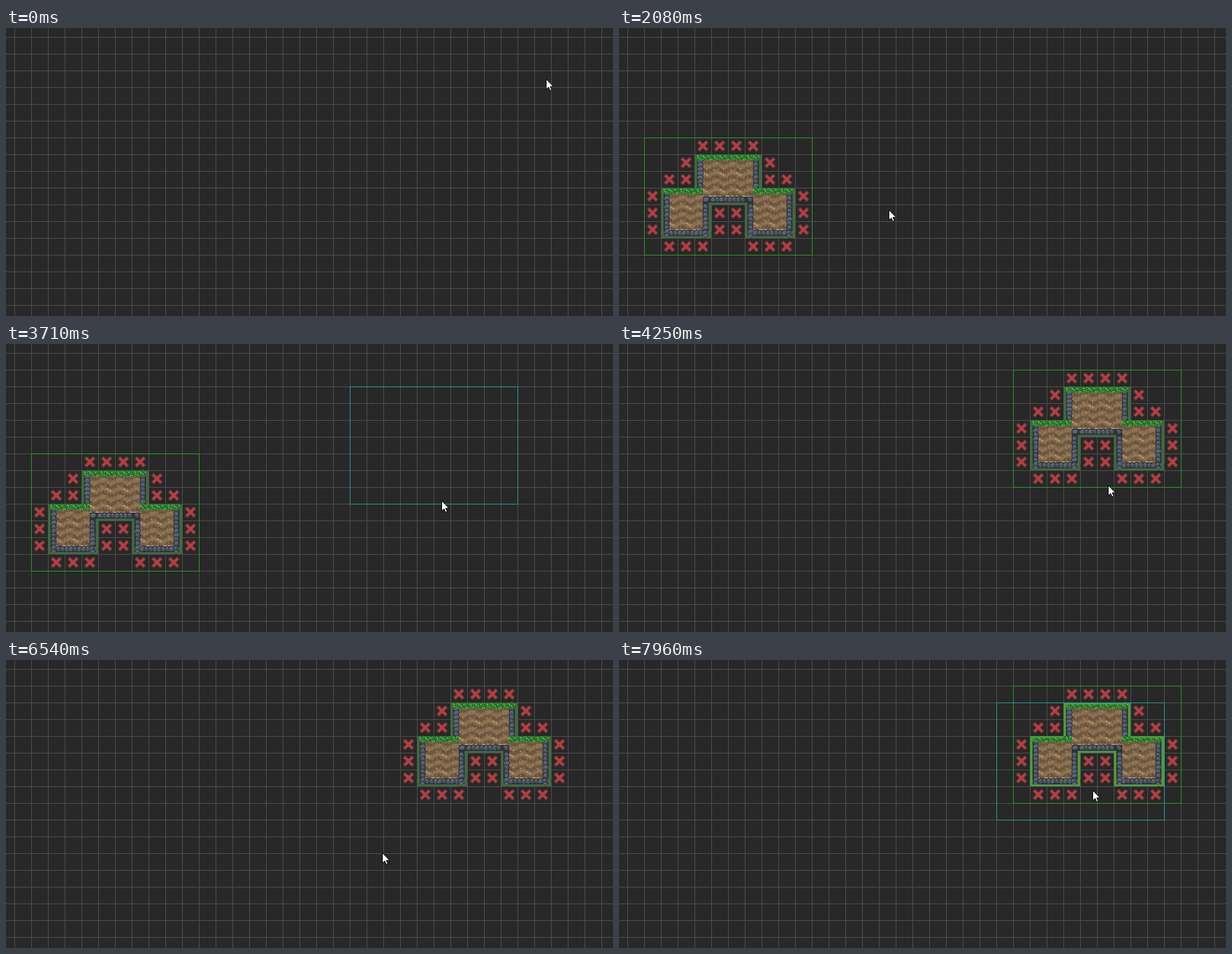
Animation, 941 px wide and 447 px high, one loop 8000 ms. Source, as an HTML page with a canvas:

```html
<!DOCTYPE html>
<html lang="en">
<head>
<meta charset="utf-8">
<title>Moving a tile group on a grid</title>
<style>
html, body { margin: 0; width: 100%; height: 100%; overflow: hidden; background: #282828; }
canvas { display: block; }
</style>
</head>
<body>
<canvas id="stage" width="941" height="447"></canvas>
<script>
const CELL = 26, GRID_X = 13, GRID_Y = 14, LOOP = 8000;
const TEXEL = CELL / 16;
const ctx = document.getElementById('stage').getContext('2d');

// x = cross marker, # = ground
const MAP = [
  '...xxxx...',
  '..x####x..',
  '.xx####xx.',
  'x########x',
  'x###xx###x',
  'x###xx###x',
  '.xxx..xxx.'
];
const WIDTH = 10 * CELL, HEIGHT = 7 * CELL;

function hash(x, y) {
  const v = Math.sin(x * 127.1 + y * 311.7) * 43758.5453;
  return v - Math.floor(v);
}

const isGround = (x, y) => MAP[Math.floor(y / CELL)]?.[Math.floor(x / CELL)] === '#';

// True where open space lies within `side` px sideways or `down` px below
const nearWall = (x, y, side, down) =>
  [-side, 0, side].some(dx => !isGround(x + dx, y) || !isGround(x + dx, y + down));

// True where open space lies within `depth` px above, or diagonally above
const nearTop = (x, y, depth, side) =>
  [-side, 0, side].some(dx => isGround(x + dx, y) && !isGround(x + dx, y - depth));

function eachCell(kind, draw) {
  MAP.forEach((row, r) => [...row].forEach((c, i) => c === kind && draw(i * CELL, r * CELL)));
}

function dirtColor(u, v) {
  const wave = Math.sin(Math.PI * (v / 4 + 0.35 * Math.sin(u * Math.PI / 8)));
  const tone = wave + (hash(u, v) - 0.5) * 1.6;
  if (hash(v + 40, u) > 0.975) return '#c0a67a';
  return tone > 0.8 ? '#947750' : tone > -0.3 ? '#80684c' : tone > -1.1 ? '#705a43' : '#5d4b3a';
}

function turfColor(u, v) {
  const tone = hash(u, v + 20);
  if (v > 4) return '#1d4a28';
  return tone > 0.84 ? '#5bb23b' : tone > 0.4 ? '#2c8830' : '#226a2c';
}

// Colours every ground pixel; a null colour leaves it as it was
function paintGround(g, colorAt) {
  eachCell('#', (cx, cy) => {
    for (let j = 0; j < CELL; j++) for (let i = 0; i < CELL; i++) {
      const u = Math.floor(i / TEXEL), v = Math.floor(j / TEXEL);
      const color = colorAt(cx + i, cy + j, u, v);
      if (!color) continue;
      g.fillStyle = color;
      g.fillRect(cx + i, cy + j, 1, 1);
    }
  });
}

function drawStone(g, x, y) {
  const seed = hash(x, y);
  g.fillStyle = `hsl(218 13% ${32 + seed * 7}%)`;
  g.strokeStyle = '#2a2f38';
  g.lineWidth = 1;
  g.beginPath();
  g.ellipse(x, y, 4 + seed, 3.7, seed * 3, 0, 7);
  g.fill();
  g.stroke();
  g.fillStyle = '#707a8a';
  g.fillRect(Math.round(x - 2), Math.round(y - 2), 3, 1);
}

function drawStones(g) {
  eachCell('#', (x, y) => {
    const cx = x + CELL / 2, cy = y + CELL / 2;
    const open = (dx, dy) => !isGround(cx + dx * CELL, cy + dy * CELL);
    for (let k = -1.5; k < 2; k++) {
      const along = k * CELL / 4;
      for (const s of [-1, 1]) if (open(s, 0)) drawStone(g, cx + s * 4, cy + along);
      if (open(0, 1)) drawStone(g, cx + along, cy + 5);
    }
    for (const s of [-1, 1]) {
      if (open(s, 1) && !open(s, 0) && !open(0, 1)) drawStone(g, cx + s * 5, cy + 5);
    }
  });
}

function drawCross(g, x, y) {
  const cx = x + CELL / 2, cy = y + CELL / 2;
  for (const [color, width, reach] of [['#443a3a', 6, 7.2], ['#bf3b3d', 3.8, 6.3]]) {
    g.strokeStyle = color;
    g.lineWidth = width;
    g.beginPath();
    for (const s of [-1, 1]) {
      g.moveTo(cx - reach, cy - reach * s);
      g.lineTo(cx + reach, cy + reach * s);
    }
    g.stroke();
  }
}

function makeGroup(rim, topRim) {
  const canvas = document.createElement('canvas');
  canvas.width = WIDTH;
  canvas.height = HEIGHT;
  const g = canvas.getContext('2d');
  paintGround(g, (x, y, u, v) => {
    if (nearWall(x, y, 13, 12)) return '#2d323b';
    if (nearWall(x, y, 13, 14) && hash(u, 5) > 0.5) return '#b3946a';
    return dirtColor(u, v);
  });
  drawStones(g);
  paintGround(g, (x, y, u, v) => {
    if (nearTop(x, y, topRim, 0) || nearWall(x, y, 4, 3)) return rim;
    return nearTop(x, y, 9, 13) ? turfColor(u, v) : null;
  });
  eachCell('x', (x, y) => drawCross(g, x, y));
  return canvas;
}

const dimGroup = makeGroup('#40693a', 1);
const brightGroup = makeGroup('#4c9a38', 3);

// Pointer stops: arrival time, departure time, x, y
const STOPS = [
  [0, 40, 837, 79], [460, 1380, 542, 238], [1580, 1740, 428, 277], [1790, 1960, 418, 267],
  [2080, 2080, 418, 282], [2750, 2790, 188, 333], [3170, 3170, 322, 330], [3580, 3580, 628, 255],
  [4250, 4250, 758, 219], [4380, 4630, 749, 220], [4960, 6040, 780, 194], [6830, 6830, 438, 372],
  [7170, 7170, 381, 381], [7670, 7730, 750, 187], [LOOP, LOOP, 733, 203]
];

// Speed through a stop: zero when resting or turning back
function speed(i, axis) {
  const a = STOPS[i - 1], b = STOPS[i], c = STOPS[i + 1];
  if (!a || !c || b[0] !== b[1] || (b[axis] - a[axis]) * (c[axis] - b[axis]) <= 0) return 0;
  return (c[axis] - a[axis]) / (c[0] - a[1]);
}

function pointerAt(t) {
  const next = STOPS.findIndex(stop => t < stop[0]);
  const a = STOPS[next - 1], b = STOPS[next], span = b[0] - a[1];
  const u = Math.max(0, (t - a[1]) / span);
  return [2, 3].map(axis =>
    a[axis] + (b[axis] - a[axis]) * u * u * (3 - 2 * u)
    + span * u * (1 - u) * ((1 - u) * speed(next - 1, axis) - u * speed(next, axis)));
}

function drawGrid() {
  ctx.fillStyle = '#282828';
  ctx.fillRect(0, 0, 941, 447);
  ctx.fillStyle = '#515151';
  for (let x = GRID_X; x < 941; x += CELL) ctx.fillRect(x, 0, 1, 447);
  for (let y = GRID_Y; y < 447; y += CELL) ctx.fillRect(0, y, 941, 1);
}

function drawFrame(x, y, color) {
  ctx.strokeStyle = color;
  ctx.lineWidth = 1;
  ctx.strokeRect(x + 0.5, y + 0.5, WIDTH, HEIGHT);
}

const arrow = new Path2D('M.5 .5V16.2L4.1 12.8L6.6 18.3L9 17.2L6.6 11.9H11.6Z');

function drawPointer(x, y) {
  ctx.save();
  ctx.translate(Math.round(x), Math.round(y));
  ctx.fillStyle = '#fff';
  ctx.strokeStyle = '#000';
  ctx.lineWidth = 1;
  ctx.fill(arrow);
  ctx.stroke(arrow);
  ctx.restore();
}

function render(t) {
  const [px, py] = pointerAt(t);
  const moved = t >= 4150, reselected = t >= 7080;
  const x = moved ? 611 : 39, y = moved ? 40 : 170;
  drawGrid();
  if (t >= 1960) {
    ctx.drawImage(reselected ? brightGroup : dimGroup, x, y);
    if (t < 5790 || reselected) drawFrame(x, y, '#22a722');
  }
  // The dragged frame follows the pointer cell by cell
  if ((t >= 2800 && !moved) || t >= 7740) {
    const [grabCol, grabRow] = moved ? [28, 6] : [6, 12];
    const dx = Math.floor((px - GRID_X) / CELL) - grabCol;
    const dy = Math.floor((py - GRID_Y) / CELL) - grabRow;
    drawFrame(x + dx * CELL, y + dy * CELL, '#20a5a5');
  }
  drawPointer(px, py);
}

function tick() {
  render(performance.now() % LOOP);
  requestAnimationFrame(tick);
}
tick();
</script>
</body>
</html>
```
